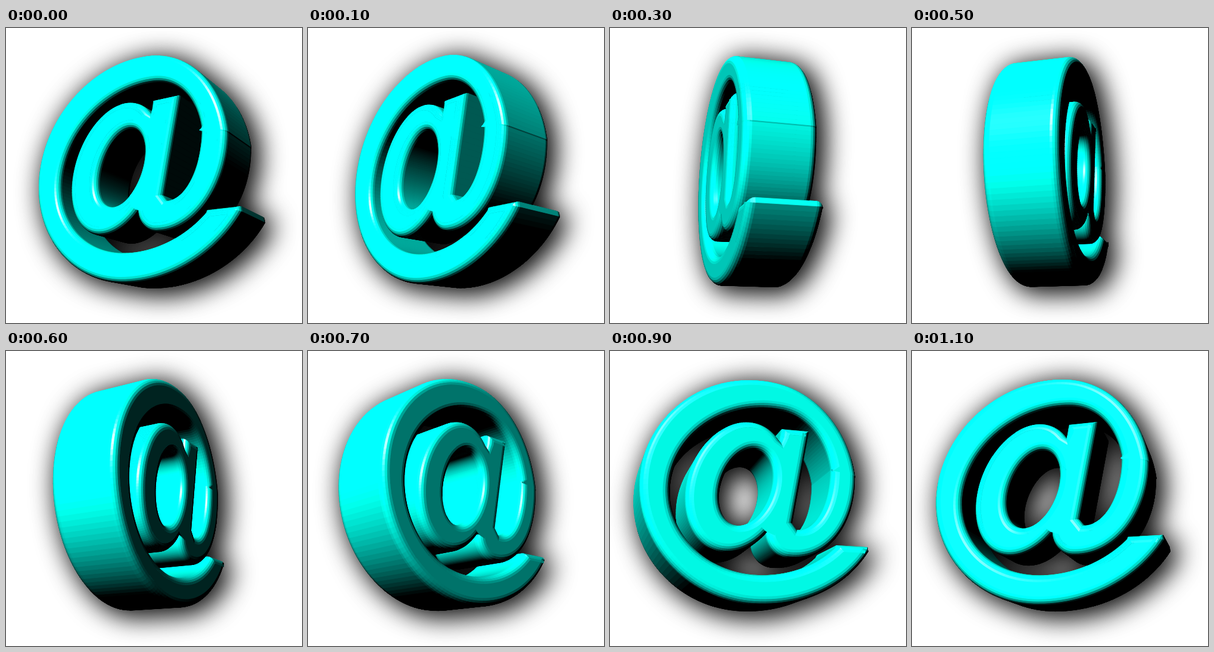
Animation of 497 by 495 pixels, one loop 1200 ms. Source, as an HTML page with a canvas:

```html
<!DOCTYPE html>
<html lang="en">
<head>
<meta charset="utf-8">
<title>Turning at sign</title>
<style>
html, body { margin: 0; width: 100%; height: 100%; overflow: hidden; background: #fff; }
canvas { display: block; }
</style>
</head>
<body>
<canvas id="stage" width="497" height="495"></canvas>
<script>
const W = 497, H = 495, CX = 239, CY = 243;
const CAM = 1150, PITCH = 0.27, HALF = 57, BEVEL = 12;
const LIGHT = [-0.5, 0.77, 0.97], GLINT = [-0.05, 0.42, 0.906];
const RAD = Math.PI / 180;

const stage = document.getElementById('stage').getContext('2d');
const layer = document.createElement('canvas');
layer.width = W;
layer.height = H;
const art = layer.getContext('2d');

// Points along a slanted ellipse, angles in degrees, counter-clockwise.
function arc(cx, cy, rx, ry, slant, from, to) {
  const steps = Math.ceil(Math.abs(to - from) / 2.5);
  return Array.from({ length: steps + 1 }, (_, i) => {
    const a = (from + (to - from) * i / steps) * RAD;
    return [cx + rx * Math.cos(a) + slant * Math.sin(a), cy - ry * Math.sin(a)];
  });
}

const outer = (rx, from, to) => arc(233.5, 236.5, rx, 189.5, 20, from, to);
const inner = (rx, from, to) => arc(239, 234, rx, 142, 26, from, to);

// The sign as seen on its front face turned by 15 degrees.
const BODY = [
  [421, 308], ...outer(218, -25, -90), ...outer(193, -90, -270), ...outer(165, 90, 16),
  ...arc(275, 186, 122, 156, 0, 0, -90), ...arc(272, 303, 37, 39, 0, -90, -180),
  ...arc(190, 232.5, 80, 110.5, 25, -38.5, -308.5),
  [263, 123], [311, 118], [280, 282],
  ...arc(288, 178, 64, 114, 0, -90, 0), ...inner(112, 22, 90), ...inner(154, 90, 270),
  ...inner(166, 270, 325), [362, 311]
];
const COUNTER = arc(203, 231.5, 42, 65.5, 17, 0, 360);

const dot = (a, b) => a[0] * b[0] + a[1] * b[1] + a[2] * b[2];
const turn = (u, v, a) => [u * Math.cos(a) - v * Math.sin(a), u * Math.sin(a) + v * Math.cos(a)];

function rotate([x, y, z], yaw) {
  const [x1, z1] = turn(x, z, yaw);
  const [z2, y2] = turn(z1, y, PITCH);
  return [x1, y2, z2];
}

function unrotate([x, y, z], yaw) {
  const [z1, y1] = turn(z, y, -PITCH);
  const [x1, z2] = turn(x, z1, -yaw);
  return [x1, y1, z2];
}

// Lays a screen point back onto the front of the solid.
function unproject([px, py]) {
  const o = unrotate([0, 0, CAM], 15 * RAD);
  const d = unrotate([px - CX, CY - py, -CAM], 15 * RAD);
  const t = (HALF - BEVEL / 2 - o[2]) / d[2];
  return [o[0] + t * d[0], o[1] + t * d[1]];
}

// Splits long edges and drops empty ones.
const split = points => points.flatMap((p, i) => {
  const q = points[(i + 1) % points.length];
  const len = Math.hypot(q[0] - p[0], q[1] - p[1]);
  const parts = len < 0.5 ? 0 : Math.ceil(len / 10);
  return Array.from({ length: parts }, (_, k) => [0, 1].map(c => p[c] + (q[c] - p[c]) * k / parts));
});

// Adds edge normals and the mitre direction used for the rounded rims.
function outline(points) {
  const pts = split(points.map(unproject)), n = pts.length;
  const normals = pts.map((p, i) => {
    const q = pts[(i + 1) % n], dx = q[0] - p[0], dy = q[1] - p[1], len = Math.hypot(dx, dy);
    return [-dy / len, dx / len];
  });
  const mitres = normals.map((b, i) => {
    const a = normals[(i + n - 1) % n];
    const k = Math.max(1 + a[0] * b[0] + a[1] * b[1], 0.6);
    return [(a[0] + b[0]) / k, (a[1] + b[1]) / k];
  });
  return { pts, normals, mitres };
}

const shapes = [BODY, COUNTER].map(outline);

// Cross-section from the back rim to the front rim.
const profile = [];
for (const side of [-1, 1]) {
  for (let i = 0; i <= 5; i++) {
    const angle = (side < 0 ? i - 5 : i) * 18 * RAD;
    profile.push({
      angle,
      inset: BEVEL * (1 - Math.cos(angle)),
      z: side * (HALF - BEVEL) + BEVEL * Math.sin(angle)
    });
  }
}

function colour(normal) {
  const lit = Math.max(0, dot(normal, LIGHT));
  const glint = Math.max(0, dot(normal, GLINT)) ** 80;
  const level = v => Math.round(255 * Math.min(1, v));
  return `rgb(${level(glint * 0.9)},${level(lit)},${level(lit * 0.92)})`;
}

const facing = (normal, p) => dot(normal, [-p[0], -p[1], CAM - p[2]]) > 0;

function trace(points) {
  points.forEach((p, i) => {
    const s = CAM / (CAM - p[2]);
    art[i ? 'lineTo' : 'moveTo'](CX + p[0] * s, CY - p[1] * s);
  });
  art.closePath();
}

function drawSolid(yaw) {
  art.clearRect(0, 0, W, H);
  art.lineWidth = 0.8;
  art.lineJoin = 'round';

  const rings = profile.map(({ inset, z }) => shapes.map(({ pts, mitres }) =>
    pts.map((p, i) => rotate([p[0] - mitres[i][0] * inset, p[1] - mitres[i][1] * inset, z], yaw))));

  const edges = shapes.flatMap(({ pts, normals }, shape) => pts.map((p, i) => {
    const next = (i + 1) % pts.length, q = pts[next];
    const depth = rotate([(p[0] + q[0]) / 2, (p[1] + q[1]) / 2, 0], yaw)[2];
    return { shape, i, next, depth, normal: normals[i] };
  })).sort((a, b) => a.depth - b.depth);

  for (let k = 0; k + 1 < profile.length; k++) {
    const angle = (profile[k].angle + profile[k + 1].angle) / 2;
    const flat = Math.cos(angle), rise = Math.sin(angle);
    for (const { shape, i, next, normal } of edges) {
      const low = rings[k][shape], high = rings[k + 1][shape];
      const n = rotate([normal[0] * flat, normal[1] * flat, rise], yaw);
      if (!facing(n, low[i])) continue;
      art.fillStyle = art.strokeStyle = colour(n);
      art.beginPath();
      trace([low[i], low[next], high[next], high[i]]);
      art.fill();
      art.stroke();
    }
  }

  const front = rings[rings.length - 1], n = rotate([0, 0, 1], yaw);
  if (facing(n, front[0][0])) {
    art.fillStyle = colour(n);
    art.beginPath();
    front.forEach(trace);
    art.fill();
  }
}

function drawStage(yaw) {
  drawSolid(yaw);
  stage.fillStyle = '#fff';
  stage.fillRect(0, 0, W, H);
  stage.save();
  stage.shadowBlur = 46;
  stage.shadowOffsetX = 10;
  stage.shadowOffsetY = 7;
  for (const shade of ['#000', 'rgba(0,0,0,0.4)']) {
    stage.shadowColor = shade;
    stage.drawImage(layer, 0, 0);
  }
  stage.restore();
  stage.drawImage(layer, 0, 0);
}

// Twelve poses, 15 degrees apart, sweeping half a turn.
let shown = -1;
const start = performance.now();
function tick() {
  const pose = Math.floor((performance.now() - start) / 100) % 12;
  if (pose !== shown) {
    shown = pose;
    drawStage(((pose * 15 + 105) % 180 - 75) * RAD);
  }
  requestAnimationFrame(tick);
}
tick();
</script>
</body>
</html>
```
